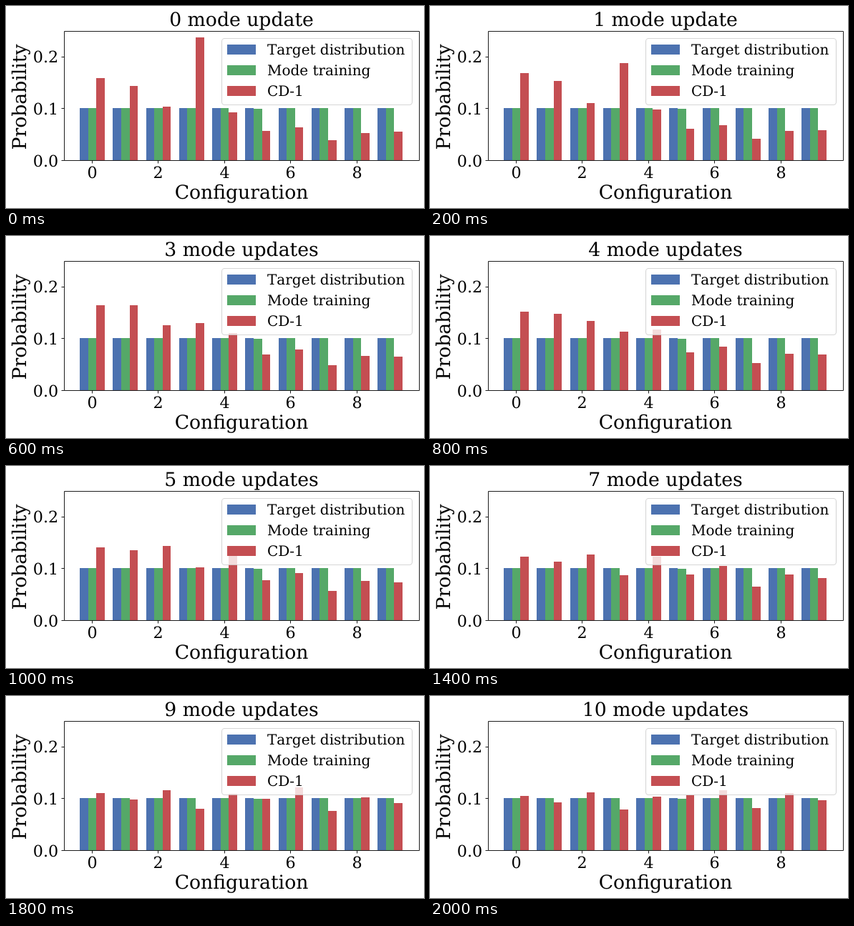
Animation, 584 px wide and 283 px high, one loop 2200 ms. Source, as an HTML page:

```html
<!DOCTYPE html>
<html lang="en">
<head>
<meta charset="utf-8">
<title>Mode updates</title>
<style>
  html, body { margin: 0; width: 100%; height: 100%; overflow: hidden; background: #fff; }
  svg { display: block; }
  text { font-family: "DejaVu Serif", serif; font-kerning: none; text-rendering: geometricPrecision; }
  .big { font-size: 26.67px; text-anchor: middle; }
  .tick { font-size: 22.22px; }
  .key { font-size: 20px; }
</style>
</head>
<body>
<svg id="chart" width="584" height="283" viewBox="0 0 584 283"></svg>
<script>
const STEP = 200, UPDATES = 10;
const BASE = 216, TARGET = 73;
const BLUE = '#4c72b0', GREEN = '#55a868', RED = '#c44e52';

// A red bar grows geometrically until its turn as the mode, then relaxes to its end height.
const BARS = [
  { start: 115, turn: 2, peak: 130, end: 76, keep: 0.86 },
  { start: 104, turn: 2.6, peak: 124, end: 67, keep: 0.85 },
  { start: 75, turn: 5, peak: 104, end: 81 },
  { start: 172, turn: 0, peak: 172, end: 57, keep: 0.7 },
  { start: 67, turn: 6, peak: 96, end: 75 },
  { start: 41, peak: 77 },
  { start: 46, turn: 9, peak: 88, end: 84 },
  { start: 28, peak: 59 },
  { start: 38, peak: 80 },
  { start: 40, peak: 70 }
];

function heightAt(n, { start, turn = UPDATES, peak, end, keep = 0.8 }) {
  if (n < turn) return start * (peak / start) ** (n / turn);
  if (turn === UPDATES) return peak;
  const relaxed = (1 - keep ** (n - turn)) / (1 - keep ** (UPDATES - turn));
  return peak + (end - peak) * relaxed;
}

const svg = document.getElementById('chart');

function add(name, attrs, content = '') {
  const el = document.createElementNS('http://www.w3.org/2000/svg', name);
  for (const key in attrs) el.setAttribute(key, attrs[key]);
  el.textContent = content;
  return svg.appendChild(el);
}

const label = (content, x, y, cls, more = {}) => add('text', { x, y, class: cls, ...more }, content);
const line = d => add('path', { d, fill: 'none', stroke: '#000', 'stroke-width': 0.89 });

const UNIT = 46.247, ORIGIN = 120.49;
const edge = (i, side) => Math.round(ORIGIN + UNIT * (i + side * 0.125));

function setHeight(rect, value) {
  const height = Math.round(value);
  rect.setAttribute('y', BASE - height);
  rect.setAttribute('height', height);
}

function bar(i, slot, height, fill) {
  const x = edge(i, slot * 2 - 3);
  const rect = add('rect', { x, width: edge(i, slot * 2 - 1) - x, fill });
  setHeight(rect, height);
  return rect;
}

const redBars = BARS.map((spec, i) => {
  bar(i, 0, TARGET, BLUE);
  bar(i, 1, i === 5 ? TARGET - 1 : TARGET, GREEN);
  return bar(i, 2, spec.start, RED);
});

line('M81.5 35.5H577.5V216.5H81.5Z');
for (let n = 0; n < 10; n += 2) {
  const x = Math.floor(ORIGIN + UNIT * n) + 0.5;
  line(`M${x} 216.5v4`);
  label(n, x, 241, 'tick', { 'text-anchor': 'middle' });
}
['0.0', '0.1', '0.2'].forEach((value, i) => {
  line(`M81.5 ${Math.floor(BASE - 72.3 * i) + 0.5}h-4`);
  label(value, 73.2, 225 - 73 * i, 'tick', { 'text-anchor': 'end' });
});

const title = label('', 329, 28, 'big');
label('Configuration', 329, 270, 'big');
label('Probability', 0, 0, 'big', { transform: 'translate(28 127.5) rotate(-90)' });

add('rect', {
  x: 301.5, y: 45.5, width: 266, height: 93, rx: 4,
  fill: '#fff', 'fill-opacity': 0.8,
  stroke: '#ccc', 'stroke-width': 1.1, 'stroke-opacity': 0.8
});
[['Target distribution', BLUE], ['Mode training', GREEN], ['CD-1', RED]].forEach(([name, fill], i) => {
  const y = 54 + 29 * i;
  add('rect', { x: 309, y, width: 40, height: 14, fill });
  label(name, 365, y + 14, 'key');
});

let shown = -1;
function draw(now) {
  const n = Math.floor(now / STEP) % (UPDATES + 1);
  if (n === shown) return;
  shown = n;
  title.textContent = `${n} mode update${n < 2 ? '' : 's'}`;
  redBars.forEach((rect, i) => setHeight(rect, heightAt(n, BARS[i])));
}

const start = performance.now();
function loop() {
  draw(performance.now() - start);
  requestAnimationFrame(loop);
}
loop();
</script>
</body>
</html>
```
